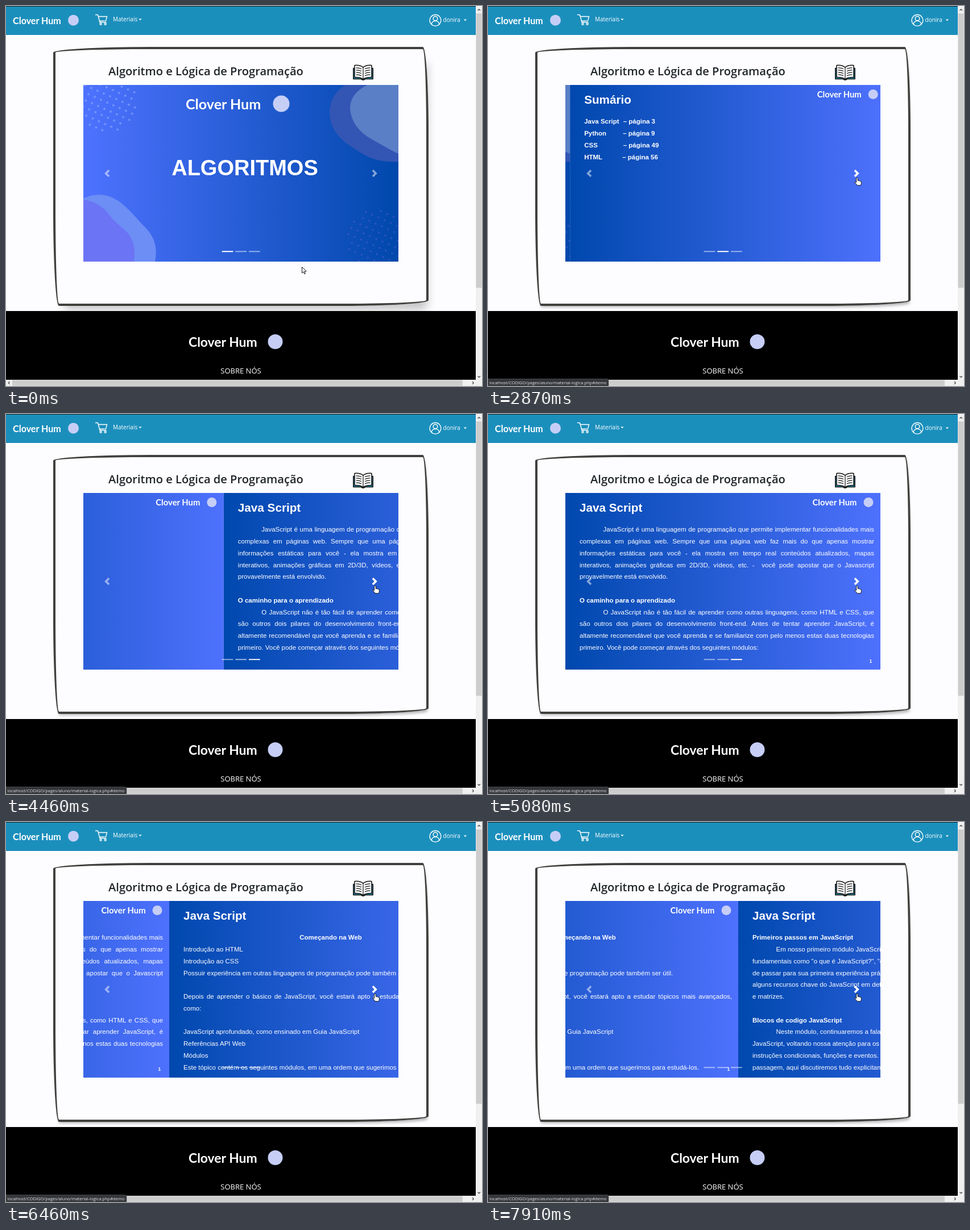
These frames come from a looping animation (837x669 px, 8000 ms). An HTML page:

```html
<!DOCTYPE html>
<html lang="pt">
<head>
<meta charset="utf-8">
<title>Algoritmo e Lógica de Programação</title>
<style>
html, body { margin: 0; width: 100%; height: 100%; overflow: hidden; background: #fdfdff; }
#stage { position: relative; width: 837px; height: 669px; overflow: hidden; }
#stage > *, .slide, .slide > * { position: absolute; }
.nav { left: 0; top: 0; width: 826px; height: 50px; background: #1b8fbc; border-top: 1px solid #10222c; }
.foot { left: 0; top: 537px; width: 826px; height: 121px; background: #000; }
.card {
  left: 83px; top: 72px; width: 660px; height: 456px; box-sizing: border-box;
  border: 4px solid #41403e;
  border-radius: 170px 10px 150px 10px / 10px 150px 10px 170px;
}
#show { left: 136px; top: 139px; width: 554px; height: 311px; overflow: hidden; }
.slide {
  left: 0; top: 0; width: 554px; height: 311px; color: #fff;
  background: linear-gradient(90deg, #0048ae, #4e71fd);
  font: 11.5px/20.75px "Liberation Sans", Arial, sans-serif;
}
.slide.cover { background: linear-gradient(90deg, #4e72ff, #0048ac); }
.slide svg { left: 0; top: 0; }
.slide h2 { left: 25px; top: 16px; margin: 0; font-size: 20.7px; line-height: 20.7px; }
.line { left: 25px; width: 518px; white-space: nowrap; }
.bold { font-weight: bold; }
.just { text-align: justify; text-align-last: justify; }
.indent { text-indent: 41.5px; }
.mid { text-align: center; font-weight: bold; }
.page { left: 534.5px; top: 286px; font-size: 8.5px; font-weight: bold; }
.logo { font: 700 16px Lato, sans-serif; fill: #fff; }
.ui { font-family: "Open Sans", "Noto Sans", sans-serif; }
</style>
</head>
<body>
<div id="stage">
  <div class="nav"></div>
  <div class="card" id="card"></div>
  <div class="foot"></div>
  <div id="show"></div>
  <svg id="over" width="837" height="669" viewBox="0 0 837 669">
    <g id="logos"></g>
    <g class="ui" fill="#fff">
      <text x="188" y="27" font-size="10">Materiais</text>
      <text x="768.5" y="28" font-size="10">donira</text>
      <path d="M233.3 22.6h5.4l-2.7 2.7zM804.8 23.6h5.4l-2.7 2.7z"/>
      <text x="413" y="647" font-size="13" text-anchor="middle">SOBRE NÓS</text>
      <text x="180" y="121.5" font-size="20.1" font-weight="600" fill="#212529">Algoritmo e Lógica de Programação</text>
    </g>
    <g fill="none" stroke="#fff" stroke-width="1.4" stroke-linecap="round" stroke-linejoin="round">
      <path d="M157.5 15.5h4l3.5 13h11M162.4 18.5h15.2l-2 7.4-11.4.6"/>
      <circle cx="166.6" cy="31.6" r="1.6"/><circle cx="174.6" cy="31.6" r="1.6"/>
      <circle cx="755" cy="25.2" r="9.9"/><circle cx="755" cy="22" r="3.8"/>
      <path d="M748 32c1-4.4 4-5.6 7-5.6s6 1.2 7 5.6"/>
    </g>
    <g stroke="#111" stroke-width="1.5" stroke-linejoin="round">
      <path d="M610.8 109.5h34.4v19h-13.5q-3.7 3.4-7.4 0h-13.5z" fill="#2593ad"/>
      <path d="M628 108q-5-4.5-15-3.6v21.2q10-.8 15 3.4q5-4.2 15-3.4v-21.2q-10-.9-15 3.6z" fill="#fff"/>
      <path id="rules" fill="none" stroke-width="1.2"/>
    </g>
    <g id="bars"></g>
    <g fill="#fff">
      <path opacity=".5" transform="translate(171.1 288) scale(1.667)" d="M5.25 0l-4 4 4 4 1.5-1.5L4.25 4l2.5-2.5L5.25 0z"/>
      <path id="next" transform="translate(641.5 288) scale(1.667)" d="M2.75 0l-1.5 1.5L3.75 4l-2.5 2.5L2.75 8l4-4-4-4z"/>
      <g id="marks"></g>
    </g>
    <g id="bubble">
      <path d="M0 656.5h209.5q2.5 0 2.5 2.5v10H0z" fill="#35363a" stroke="#5c5d60" stroke-width=".6"/>
      <text class="ui" x="2.5" y="665.7" font-size="7.55" fill="#e4e6e9">localhost/CODIGO/pages/aluno/material-logica.php#demo</text>
    </g>
    <g id="mouse" fill="#fff" stroke="#000" stroke-width=".9" stroke-linejoin="round">
      <path id="arrow" d="M0 0V10.6L2.5 8.4L4.2 12.3L5.9 11.6L4.2 7.7H7.6Z"/>
      <path id="hand" d="M-1.3.8Q0-.8 1.3.8V5.3Q2.5 4.6 3.5 5.8Q4.8 5.1 5.6 6.4Q7 6 7.3 7.5V10.2Q7 12.3 5.9 13.5H.3Q-1 11.6-3.7 8.6Q-4 7-2.6 7.3L-1.3 8.4Z"/>
    </g>
  </svg>
</div>
<script>
const LOOP = 8000, W = 554, SLIDE_MS = 600;
const clicks = [2322, 4141, 6077, 7627];
const ticks = [0, 160, 290, 460, 573, 686, 799, 912, 1024, 1137, 1250, 1330, 1460, 1620,
  2330, 2500, 2660, 2870, 3040, 4160, 4330, 4460, 4660, 4870,
  6120, 6290, 6460, 6620, 6727, 7580, 7750, 7910];
const $ = id => document.getElementById(id);
const clamp = v => Math.min(1, Math.max(0, v));
const mix = (a, b, k) => a + (b - a) * k;

function bezier(x1, y1, x2, y2) {
  const at = (a, b, s) => 3 * a * s * (1 - s) ** 2 + 3 * b * s * s * (1 - s) + s ** 3;
  return x => {
    if (x <= 0 || x >= 1) return clamp(x);
    let lo = 0, hi = 1;
    for (let i = 0; i < 30; i++) {
      const m = (lo + hi) / 2;
      if (at(x1, x2, m) < x) lo = m; else hi = m;
    }
    return at(y1, y2, lo);
  };
}
const easeInOut = bezier(.42, 0, .58, 1), ease = bezier(.25, .1, .25, 1);

const logo = (x, y, size, cx, cy, r) =>
  `<text class="logo" x="${x}" y="${y}" style="font-size:${size}px">Clover Hum</text>
   <circle cx="${cx}" cy="${cy}" r="${r}" fill="#c6cef6"/>`;

// Tilted dot grid inside a disc
function dots(cx, cy, radius, gap, r, fill) {
  let out = '';
  const c = Math.cos(.42), s = Math.sin(.42);
  for (let i = -7; i <= 7; i++) for (let j = -7; j <= 7; j++) {
    const x = (i * c - j * s) * gap, y = (i * s + j * c) * gap;
    if (Math.hypot(x, y) < radius)
      out += `<circle cx="${(cx + x).toFixed(1)}" cy="${(cy + y).toFixed(1)}" r="${r}"/>`;
  }
  return `<g fill="${fill}">${out}</g>`;
}

const cover = `<div class="slide cover"><svg width="554" height="311" viewBox="136 139 554 311">
  <path d="M597 139C575 152 566 176 570 198C576 232 605 246 630 262C650 273 672 275 690 274V139Z" fill="#3356b5"/>
  <path d="M636 139C611 150 602 170 606 188C610 208 622 222 642 234C662 245 676 254 690 260V139Z" fill="#5a7fc6"/>
  <path d="M136 339C160 327 184 332 204 348C222 363 231 376 246 391C264 410 266 430 262 450H136Z" fill="#6c8ef5"/>
  <path d="M136 341C156 344 170 352 182 368C193 384 206 389 216 402C226 416 228 434 225 450H136Z" fill="#6b74f4"/>
  ${dots(178, 170, 51, 12, 2.1, 'rgba(150,178,255,.5)')}
  ${dots(651, 410, 51, 12, 1.7, 'rgba(100,100,205,.45)')}
  ${logo(316, 182, 25.1, 484, 172, 14.5)}
  <text x="420" y="298" text-anchor="middle" font-size="38" font-weight="bold" fill="#fff">ALGORITMOS</text>
</svg></div>`;

// Line prefixes: * bold, = justified, > indented and justified, + indented, ^ centred
const styles = { '*': 'bold', '=': 'just', '>': 'just indent', '+': 'indent', '^': 'mid' };
const line = (s, n, left = 25) => {
  const cls = styles[s[0]] || '';
  return `<div class="line ${cls}" style="left:${left}px;top:${54.3 + 20.75 * n}px">${cls ? s.slice(1) : s}</div>`;
};
const page = (title, body, num = '') => `<div class="slide"><h2>${title}</h2>${body}
  <svg width="554" height="311">${logo(434.5, 22, 14.8, 533, 16.5, 8.5)}</svg>
  <div class="page">${num}</div></div>`;
const prose = text => text.trim().split('\n').map((s, n) => line(s, n)).join('');

const index = [['Java Script', 3, 93.5], ['Python', 9, 93], ['CSS', 49, 93.5], ['HTML', 56, 92]]
  .map(([name, p, x], n) => line('*' + name, n) + line(`*– página ${p}`, n, x)).join('');

const intro = prose(`
>JavaScript é uma linguagem de programação que permite implementar funcionalidades mais
=complexas em páginas web. Sempre que uma página web faz mais do que apenas mostrar
=informações estáticas para você - ela mostra em tempo real conteúdos atualizados, mapas
=interativos, animações gráficas em 2D/3D, vídeos, etc. -&nbsp; você pode apostar que o Javascript
provavelmente está envolvido.

*O caminho para o aprendizado
>O JavaScript não é tão fácil de aprender como outras linguagens, como HTML e CSS, que
=são outros dois pilares do desenvolvimento front-end. Antes de tentar aprender JavaScript, é
=altamente recomendável que você aprenda e se familiarize com pelo menos estas duas tecnologias
primeiro. Você pode começar através dos seguintes módulos:`);

const web = prose(`
^Começando na Web
Introdução ao HTML
Introdução ao CSS
Possuir experiência em outras linguagens de programação pode também ser útil.

=Depois de aprender o básico de JavaScript, você estará apto a estudar tópicos mais avançados,
como:

JavaScript aprofundado, como ensinado em Guia JavaScript
Referências API Web
Módulos
Este tópico contém os seguintes módulos, em uma ordem que sugerimos para estudá-los.`);

const steps = prose(`
*Primeiros passos em JavaScript
+Em nosso primeiro módulo JavaScript, primeiro responderemos algumas questões
fundamentais como "o que é JavaScript?", "como ele se parece?", e "o que ele pode fazer?", antes
de passar para sua primeira experiência prática de escrever JavaScript. Depois disso, discutiremos
alguns recursos chave do JavaScript em detalhes, como variáveis, cadeias de caracteres, números
e matrizes.

*Blocos de codigo JavaScript
+Neste módulo, continuaremos a falar sobre todos os recursos chave da linguagem
JavaScript, voltando nossa atenção para os tipos mais comuns de blocos de código como
instruções condicionais, funções e eventos. Você já viu essas coisas no curso, mas apenas de
passagem, aqui discutiremos tudo explicitamente.`);

$('show').innerHTML = cover + page('Sumário', index) + page('Java Script', intro, 1)
  + page('Java Script', web, 1) + page('Java Script', steps);
const slides = [...$('show').children];

$('logos').innerHTML = logo(12, 31.5, 16.1, 118.5, 25, 9.5) + logo(321, 600, 22.9, 473.5, 591, 13);
$('rules').setAttribute('d', 'M628 108v20' + [0, 1, 2, 3].map(i =>
  `M615.5 ${109 + i * 4}q5-.3 9.5 1.8M640.5 ${109 + i * 4}q-5-.3-9.5 1.8`).join(''));
$('marks').innerHTML = [0, 1, 2].map(i =>
  `<rect x="${379.6 + i * 23.7}" y="431.2" width="19.8" height="2"/>`).join('');
const marks = [...$('marks').children];

const box = (x, y, w, h, c) => `<rect x="${x}" y="${y}" width="${w}" height="${h}" fill="${c}"/>`;
$('bars').innerHTML = box(826, 1, 11, 668, '#f0f0f0') + box(0, 658, 837, 11, '#f0f0f0')
  + box(826.5, 13, 10, 483, '#cdcdcd') + box(11, 658.5, 792, 10, '#cdcdcd')
  + `<path d="M829.5 8l2.3-2.3 2.3 2.3M829.5 651.5l2.3 2.3 2.3-2.3M6.5 661.2l-2.3 2.3 2.3 2.3M820 661.2l2.3 2.3-2.3 2.3"
      fill="none" stroke="#505050" stroke-width="1.3"/>`;

function draw(t) {
  const pos = clicks.reduce((sum, c) => sum + easeInOut((t - c) / SLIDE_MS), 0);
  slides.forEach((s, i) => {
    const x = (i - pos) * W;
    s.style.visibility = Math.abs(x) < W ? 'visible' : 'hidden';
    s.style.transform = `translateX(${x}px)`;
  });

  marks.forEach((m, i) => {
    const on = i ? ease((t - clicks[i - 1]) / SLIDE_MS) : 1;
    m.setAttribute('opacity', .5 + .5 * (on - ease((t - clicks[i]) / SLIDE_MS)));
  });

  const k = mix(.4, 1, clamp(t / 280));
  const [x, y, blur, spread] = [[13.3, 1.3], [25.3, 5.3], [22.7, 5.3], [-17.3, -3.3]]
    .map(([a, b]) => mix(a, b, k) + 'px');
  $('card').style.boxShadow = `${x} ${y} ${blur} ${spread} rgba(0,0,0,${mix(.2, .3, k)})`;

  const go = easeInOut((t - 380) / 1000);
  const over = t >= 1250;
  $('mouse').setAttribute('transform', `translate(${mix(520.5, 649, go)} ${mix(459.5, 302.3, go)})`);
  $('arrow').setAttribute('visibility', over ? 'hidden' : 'visible');
  $('hand').setAttribute('visibility', over ? 'visible' : 'hidden');
  $('next').setAttribute('opacity', mix(.5, 1, ease((t - 1200) / 150)));
  $('bubble').setAttribute('opacity', clamp((t - 1270) / 200));
}

function frame() {
  const t = performance.now() % LOOP;
  draw(ticks.findLast(v => v <= t));
  requestAnimationFrame(frame);
}
frame();
</script>
</body>
</html>
```
